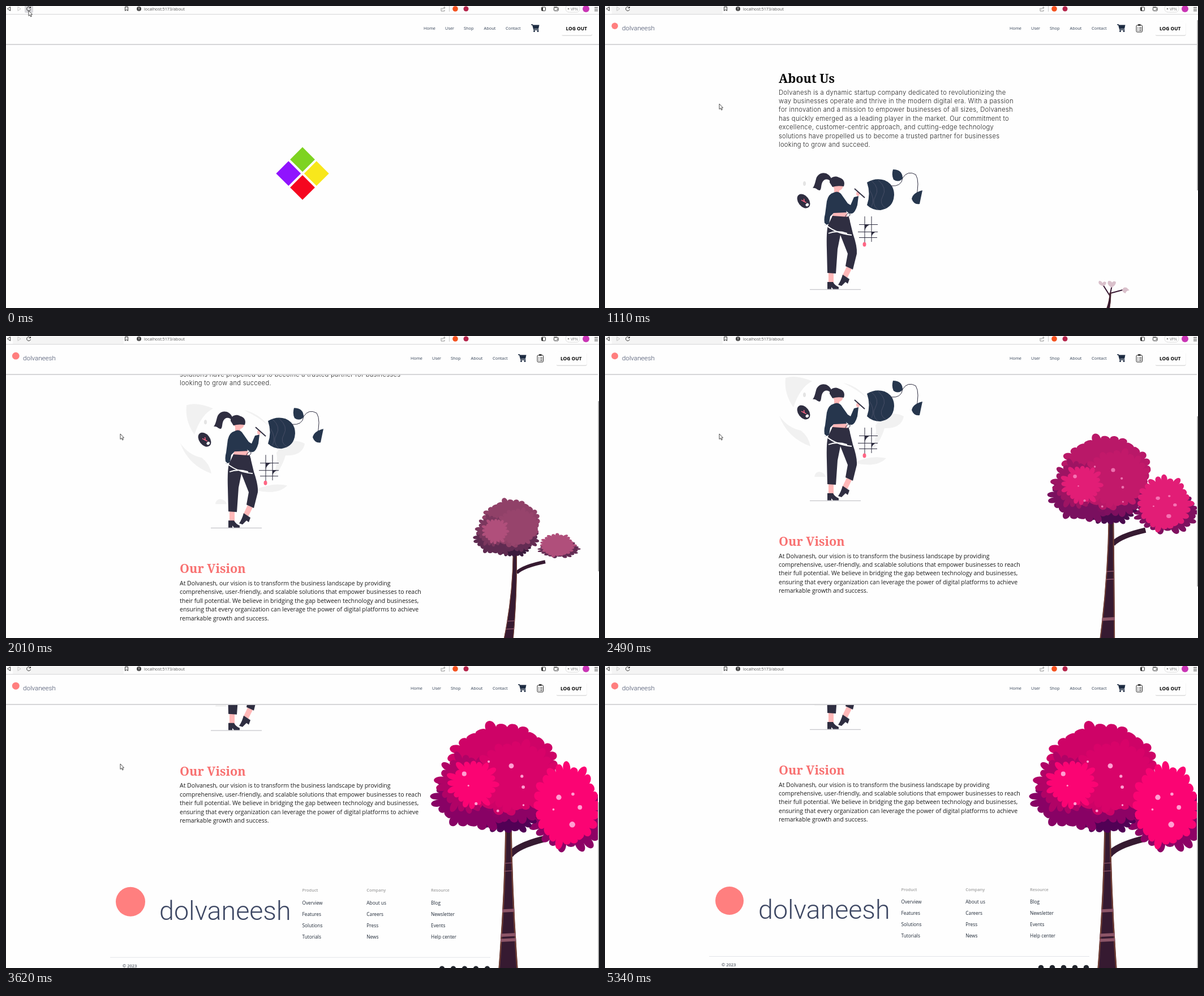
These frames come from a looping animation (1048 px wide and 534 px high, 5440 ms). An HTML page:

```html
<!DOCTYPE html>
<html lang="en">
<head>
<meta charset="utf-8">
<title>About page</title>
<style>
  html, body { margin: 0; width: 100%; height: 100%; overflow: hidden; background: #fefefe; }
  svg { display: block; width: 1048px; height: 534px; }
  text { font-family: "Open Sans", sans-serif; white-space: pre; }
  .title { font: 700 21.6px "Noto Serif", serif; }
  .light { font: 300 11.2px Inter, sans-serif; letter-spacing: .3px; fill: #222; }
  .body { font-size: 10.5px; fill: #1c1c1c; }
  .nav { font-size: 7.4px; fill: #334155; }
  .link { font-size: 8.3px; fill: #1f2937; }
  .label { font-size: 7.4px; font-weight: 600; fill: #a0a0a0; }
  .word { font: 300 46.6px Roboto, sans-serif; fill: #3d4763; }
  .line { fill: none; stroke: #2f2e41; }
  .dark { fill: #2f2e41; }
  .navy { fill: #26364d; }
  .skin { fill: #ffb8b8; }
</style>
</head>
<body>
<svg viewBox="0 0 1048 534">
  <defs>
    <clipPath id="trunkClip"><path id="trunkShape"/></clipPath>
    <clipPath id="view"><path d="M0 0H1046V534H0Z"/></clipPath>
    <g id="logo">
      <circle id="pulse" cx="220" cy="804" fill="#ff7f7f"/>
      <text class="word" x="271" y="836">dolvaneesh</text>
    </g>
  </defs>

  <g id="loader"></g>

  <g id="page">
    <text class="title" x="307" y="136">About Us</text>
    <g id="about"></g>
    <g id="shade" fill="#f1f1f1">
      <path d="M319 284Q338 278 366 290Q345 300 333 336Q316 312 319 284Z"/>
      <path d="M308 351Q322 372 346 377Q360 388 363 405Q322 390 308 351Z"/>
      <path d="M421 293Q446 298 463 320Q448 306 421 293Z"/>
      <path d="M478 368Q500 338 528 352Q524 374 494 373Q486 400 470 412Q482 388 478 368Z"/>
      <path d="M440 434Q470 420 497 426Q480 444 440 434Z"/>
      <path d="M370 459Q371 451 378 450Q388 451 390 459Z"/>
    </g>
    <path d="M362 501.3H452" stroke="#b8b8be"/>
    <ellipse cx="352.5" cy="314" rx="2.5" ry="4" fill="#e4e4e4"/>
    <g transform="translate(351 345) rotate(-38)">
      <ellipse class="dark" rx="9.5" ry="14"/><ellipse cx="1" cy="9" rx="3" ry="2.5" fill="#fff"/>
      <path d="M-2-4l4 9M3-3l-3 5" stroke="#ff6584" stroke-width="1.5"/>
    </g>
    <path class="dark" d="M400 305C394 292 377 292 373 306C371 314 370 318 367 322C373 321 374 325 379 326C384 325 380 314 387 308C392 305 396 307 400 311Z"/>
    <path class="skin" d="M405 316h9v16h-9z"/><ellipse class="skin" cx="412" cy="317" rx="9" ry="9.5"/>
    <path class="dark" d="M397 312C396 303 407 299 413 303C421 305 425 311 422 319Q411 317 402 320Z"/>
    <path class="skin" d="M404 364H427L428 373H401ZM395 470h9v20h-9zM427 461l9 4-9 18-8-5z"/>
    <path class="navy" d="M404 330Q411 326 417 332L429 349L434 352L440 338L448 336L446 352Q442 366 436 367Q430 367 426 362L427 365L404 366L398 372L396 385L389 388Q386 378 389 368L392 345Q395 332 404 330Z"/>
    <ellipse class="skin" cx="447" cy="332" rx="3" ry="4"/>
    <path class="line" d="M441 323L459 339" stroke-width="1.8"/>
    <path class="dark" d="M402 371L431 373L438 402Q446 425 445 438L438 466L425 460L429 438L416 405L411 430L408 473L393 472L392 430Q391 400 394 388Z"/>
    <path class="dark" d="M393 488H403Q406 494 413 497V500.5H403L400 497V500.5H393ZM420 475L432 483L429 491L425 488L418 495L412 493Q417 486 420 475Z"/>
    <path d="M387 384Q405 402 436 405M395 402Q410 396 428 402" fill="none" stroke="#fff" stroke-width="1.8"/>
    <path class="line" d="M424 374Q428 364 433 367Q434 373 424 374Q433 374 432 381"/>
    <path class="navy" d="M463 312Q478 303 494 308Q511 315 511 334Q510 357 487 361Q472 361 463 352Q470 332 463 312Z"/>
    <path d="M471 309Q486 322 478 336T482 360M483 308Q499 322 491 336T497 358M467 325Q478 340 471 355" fill="none" stroke="#50536b" stroke-width=".8"/>
    <path class="line" d="M505 318Q524 320 526 304Q535 290 549 298Q557 310 549 342"/>
    <path class="navy" d="M509 289Q526 289 526 305Q519 313 510 307Q506 299 509 289ZM561 326Q544 330 542 341Q546 352 556 350Q558 340 561 326Z"/>
    <path class="line" d="M459 372V418M471 372V417M449 386.5H482M447 399.5H482M449 409.5H481"/>
    <path class="dark" d="M459 386H470Q461 388 459 398ZM471 399H480Q473 401 471 408Z"/>
    <ellipse cx="458.5" cy="421.5" rx="3" ry="4" fill="#ff6584"/>

    <text class="title" x="307" y="581" fill="#f87171">Our Vision</text>
    <g id="vision"></g>
    <use href="#logo"/>
    <g id="columns"></g>
    <path d="M184 902.5H856" stroke="#e2e4e8"/>
    <text class="link" x="206" y="920" style="font-size:7.5px">© 2023</text>
    <g id="social" fill="#20242c"></g>
  </g>

  <g id="tree" clip-path="url(#view)">
    <g id="sapling">
      <path d="M892 512L880 493M893 508L896 494M893 508L915 502" fill="none" stroke="#3a1a35" stroke-width="2"/>
      <path d="M879 495Q870 492 873 486Q878 486 879 490Q882 485 886 489Q885 495 879 495ZM895 498Q885 491 890 486Q895 486 896 489Q899 485 903 488Q903 494 895 498ZM914 502Q916 496 922 498L927 503Q921 503 920 508Q915 507 914 502Z" fill="#d9c0cb"/>
    </g>
    <path id="branch" fill="none" stroke="#361a31"/>
    <g clip-path="url(#trunkClip)">
      <path id="trunk" fill="#361a31" stroke="#6e3d35"/>
      <g id="bands" stroke="#8d5668"></g>
    </g>
    <g id="rightBack"></g>
    <g id="crown"></g>
    <g id="rightFront"></g>
  </g>

  <rect id="header" y="14" height="53.5" fill="#fefefe"/>
  <rect id="headerEdge" y="67" height="2" fill="#d6d6d8"/>
  <use id="smallLogo" href="#logo" transform="translate(-37.5 -165) scale(.249)"/>
  <g id="nav">
    <path d="M928 33h2.5l2.5 9h8.500" fill="none" stroke="#1e2c42" stroke-width="1.3"/>
    <path d="M930.500 33.500H942.500l-1.500 7H932.500z" fill="#1e2c42"/>
    <path d="M933.500 44.500h0M940 44.500h0" stroke="#1e2c42" stroke-width="3" stroke-linecap="round"/>
  </g>
  <g id="clipboard" fill="none" stroke="#222">
    <rect x="939" y="34" width="10.5" height="12" rx="1.5"/><path d="M942 33.5h4.5" stroke-width="2.5"/>
    <path d="M941 38.5h1.5M941 41h1.5M941 43.5h1.5M944 38.5h4M944 41h4M944 43.5h4" stroke-width=".9"/>
  </g>
  <g id="logout">
    <rect x="982" y="29" width="54" height="24" rx="3" fill="#dcdcdc"/>
    <rect x="981" y="27.5" width="55" height="24" rx="3" fill="#fefefe"/>
    <text x="989.5" y="43" font-size="8.4" font-weight="700">LOG OUT</text>
  </g>

  <rect width="1048" height="14.5" fill="#fdfdfd"/>
  <rect id="strip" x="12" y="1" width="196" height="13.5" fill="#f4f4f4"/>
  <path d="M0 14.8H1048" stroke="#d3d3d5"/>
  <rect id="hover" x="33" y="-3" width="15" height="15" rx="2" fill="#d9d9dd"/>
  <g fill="none" stroke="#333">
    <path d="M7.5 1.5V8.5L2.5 5Z"/><path d="M21 1.5V8.5L26 5Z" stroke="#c4c4c4"/>
    <path d="M43 3A3.5 3.5 0 1 0 43.5 6M43.5 1V3.5H41"/>
    <path d="M210.5 1.5h5v7l-2.5-2-2.5 2Z"/>
    <path d="M770 4h-1v5h6v-2M771 6q0-3 4-3M774 1l2 2-2 2" stroke="#777" stroke-width=".8"/>
    <path d="M783.5 0V10" stroke="#ccc"/>
    <rect x="946.5" y="2" width="7" height="6.5" rx="1"/><path d="M948 2.5v6" stroke-width="2"/>
    <rect x="968.5" y="2.5" width="7.5" height="6" rx="1"/><path d="M968 2h6M973 5.5h3"/>
    <rect x="989" y="-2" width="25" height="13" rx="6" stroke="#ddd"/>
    <path d="M1040 2.5h6M1040 5.5h6M1040 8.5h6"/>
  </g>
  <circle cx="235" cy="5" r="4" fill="#444"/><path d="M235 2.5V5.5M235 6.5V7.5" stroke="#fff"/>
  <circle cx="794" cy="5" r="4.8" fill="#f4511e"/>
  <circle cx="813" cy="5" r="4.5" fill="#b4234a"/>
  <circle cx="1025" cy="5" r="6" fill="#c935b4"/>
  <text x="244" y="8" font-size="7.3" fill="#555">localhost:5173/about</text>
  <circle cx="994" cy="5" r="1.3" fill="#888"/>
  <text x="998" y="7.5" font-size="6.5" fill="#777">VPN</text>
  <rect id="thumb" x="1046.5" width="1.5" height="301" fill="#9c9c9c"/>
  <path id="cursor" d="M0 0V9.5L2.2 7.6L3.7 11L5.3 10.3L3.8 7H6.5Z" fill="#fff" stroke="#222" stroke-width=".8"/>
</svg>

<script>
const LOOP = 5440, STEPS = 44, STEP = LOOP / STEPS;
const READY = 6, SCROLL = 11;   // steps at which the page appears and scrolling begins

const $ = id => document.getElementById(id);
const set = (id, attrs) => { for (const a in attrs) $(id).setAttribute(a, attrs[a]); };
const show = (id, on) => { $(id).style.display = on ? '' : 'none'; };
const add = (id, markup) => $(id).insertAdjacentHTML('beforeend', markup);
const text = (cls, x, y, s) => `<text class="${cls}" x="${x}" y="${y}">${s}</text>`;
const lines = (id, cls, y, copy) => copy.trim().split(/\s*\n\s*/)
  .forEach((s, i) => add(id, text(cls, 307, y + i * 15.45, s)));

const clamp = u => Math.min(1, Math.max(0, u));
const easeOut = (u, power) => 1 - (1 - clamp(u)) ** power;
const randomFrom = seed => () => (seed = (seed * 16807 + 11) % 2147483647) / 2147483647;

lines('about', 'light', 156.5, `
  Dolvanesh is a dynamic startup company dedicated to revolutionizing the
  way businesses operate and thrive in the modern digital era. With a passion
  for innovation and a mission to empower businesses of all sizes, Dolvanesh
  has quickly emerged as a leading player in the market. Our commitment to
  excellence, customer-centric approach, and cutting-edge technology
  solutions have propelled us to become a trusted partner for businesses
  looking to grow and succeed.`);
lines('vision', 'body', 602.5, `
  At Dolvanesh, our vision is to transform the business landscape by providing
  comprehensive, user-friendly, and scalable solutions that empower businesses to reach
  their full potential. We believe in bridging the gap between technology and businesses,
  ensuring that every organization can leverage the power of digital platforms to achieve
  remarkable growth and success.`);
[
  ['Product', 'Overview', 'Features', 'Solutions', 'Tutorials'],
  ['Company', 'About us', 'Careers', 'Press', 'News'],
  ['Resource', 'Blog', 'Newsletter', 'Events', 'Help center']
].forEach(([head, ...items], column) => {
  const x = 523.5 + column * 113.8;
  add('columns', text('label', x, 786.7, head));
  items.forEach((s, i) => add('columns', text('link', x, 809 + i * 20, s)));
});
for (let i = 0; i < 5; i++) add('social', `<circle cx="${770.5 + i * 20}" cy="922.5" r="4.8"/>`);
for (const [s, x] of Object.entries({ Home: 738, User: 776, Shop: 809, About: 844.5, Contact: 883 }))
  add('nav', text('nav', x, 42, s));
['#7ed321', '#f8e71c', '#f5061f', '#9013fe'].forEach((fill, i) =>
  add('loader', `<path d="M-33-33h31v31h-31z" fill="${fill}" transform="rotate(${i * 90})"/>`));

// An ellipse edged with rounded petals of uneven length.
function foliage(cx, cy, rx, ry) {
  const random = randomFrom(cx * cy), n = Math.round(14 + (rx + ry) / 11);
  const at = (i, length) => {
    const a = i / n * 2 * Math.PI - 1.7;
    return `${cx + (rx + length) * Math.cos(a)} ${cy + (ry + length) * Math.sin(a)}`;
  };
  let d = 'M' + at(0, 0);
  for (let i = 0; i < n; i++) {
    const length = 4 + 18 * random(), lean = .25 * random();
    d += `C${at(i - .1 + lean, length)} ${at(i + .75 + lean, length)} ${at(i + 1, 0)}`;
  }
  return d + 'Z';
}

// Group, ellipse and lightness of each layer, back to front.
const layers = [
  ['rightBack', 998, 270, 60, 46, 28],
  ['crown', 888, 264, 42, 26, 17],
  ['crown', 832, 233, 68, 48, 27],
  ['crown', 905, 226, 58, 42, 28],
  ['crown', 878, 180, 90, 72, 41],
  ['crown', 812, 206, 40, 42, 35],
  ['crown', 902, 195, 60, 54, 43],
  ['crown', 825, 208, 34, 33, 50],
  ['rightFront', 991, 247, 50, 64, 50]
].map(([group, cx, cy, rx, ry, light]) => {
  add(group, `<path d="${foliage(cx, cy, rx, ry)}"/>`);
  return { path: $(group).lastChild, light, hue: 333 - .033 * (50 - light) ** 2 };
});

// Pale blossoms spread round an ellipse.
function blossoms(group, cx, cy, rx, ry, n) {
  const random = randomFrom(cx + n);
  for (let i = 0; i < n; i++) {
    const a = i / n * 2 * Math.PI + random() * .5, r = .7 + .3 * random();
    add(group, `<circle class="blossom" cx="${cx + rx * r * Math.cos(a)}" cy="${cy + ry * r * Math.sin(a)}"
      r="${1.5 + 4 * random() ** 2}" fill="#ff9fd2"/>`);
  }
}
blossoms('crown', 866, 214, 66, 48, 9);
blossoms('rightFront', 992, 250, 30, 32, 5);

// Everything in the tree follows one growth value.
function drawTree(k) {
  set('sapling', { transform: `translate(0 ${Math.max(0, 9 - k) * 16})`, opacity: clamp((13 - k) / 2) });

  const grow = easeOut((k - SCROLL - .5) / 17.5, 2.5), girth = grow ** 1.5;
  const topX = 893 - 5 * grow + 36 * grow * (1 - grow), topY = 507 - 232 * grow + Math.max(0, 9 - k) * 16;
  const half = 3.5 + 14 * girth, topHalf = 1.5 + 4 * grow;
  const bend = topHalf + .15 * (half - topHalf), midY = (topY + 540) / 2;
  const d = `M${887.5 - half} 540Q${topX - bend} ${midY} ${topX - topHalf} ${topY}` +
    `H${topX + topHalf}Q${topX + bend} ${midY} ${887.5 + half} 540Z`;
  set('trunk', { d, 'stroke-width': half / 3.5 });
  set('trunkShape', { d });

  const bandY = 600 - 251 * girth;
  $('bands').innerHTML = [0, 14, 84, 127, 136]
    .map(y => `<path d="M860 ${bandY + y + 1}L915 ${bandY + y - 2}" stroke-width="${y < 50 ? 1.4 : 5.5}"/>`).join('');

  const rightX = 992 - 75 * (1 - grow) ** 2, rightY = 502 - 247 * grow;
  const joinX = topX + 3, joinY = 512 - 178 * grow, endY = rightY + 51 * grow;
  set('branch', {
    d: `M${joinX} ${joinY}Q${joinX + 12} ${(joinY + endY) / 2 - 2} ${rightX - 42 * grow} ${endY}`,
    'stroke-width': 11.5 * grow
  });

  set('crown', { transform: `translate(${topX - 3} ${495 - 295 * grow}) scale(${grow}) translate(-885 -200)` });
  for (const id of ['rightBack', 'rightFront'])
    set(id, { transform: `translate(${rightX} ${rightY}) scale(${grow} ${grow ** 2}) translate(-992 -255)` });

  const bloom = clamp((k - 16) / 6);
  for (const { path, hue, light } of layers)
    path.setAttribute('fill', `hsl(${hue} ${38 + 59 * bloom}% ${light}%)`);
  document.querySelectorAll('.blossom').forEach(b => b.setAttribute('opacity', bloom));
}

function drawCursor(k) {
  const enter = clamp(k / 4), leave = Math.min(8, Math.max(0, k - 29));
  const x = 40 + 162 * enter + 99.7 * leave, y = 8 + 165 * enter + 155 * (leave / 5) ** 1.6;
  set('cursor', { transform: `translate(${x} ${y})` });
  show('cursor', k < 40);
}

function draw(k) {
  const loaded = k >= READY, width = loaded ? 1046 : 1048;
  show('loader', !loaded);
  for (const id of ['page', 'tree', 'clipboard', 'thumb']) show(id, loaded);
  for (const id of ['strip', 'smallLogo']) show(id, k >= 1);
  show('hover', k < 1);
  show('shade', k > SCROLL);
  set('loader', { transform: `translate(524 296.2) rotate(${45 + k * 30})` });

  // Two turns of the wheel.
  const scroll = 210 * easeOut((k - SCROLL) / 8, 1.5) + 179 * easeOut((k - 20) / 10, 2);
  set('page', { transform: `translate(0 ${-scroll})` });
  set('thumb', { y: 25 + scroll * .557 });
  set('header', { width });
  set('headerEdge', { width });
  set('nav', { transform: `translate(${loaded ? -23 : 0})` });
  set('logout', { transform: `translate(${loaded ? -9.5 : 0})` });
  set('pulse', { r: 24 - 2 * Math.cos((k - 23) * Math.PI / 6) });

  drawCursor(k);
  if (loaded) drawTree(k);
}

// Each pose is held for one step.
function tick() {
  const t = performance.now() % LOOP;
  draw(Math.min(STEPS - 1, Math.floor((t + 15) / STEP)));
  requestAnimationFrame(tick);
}
tick();
</script>
</body>
</html>
```
